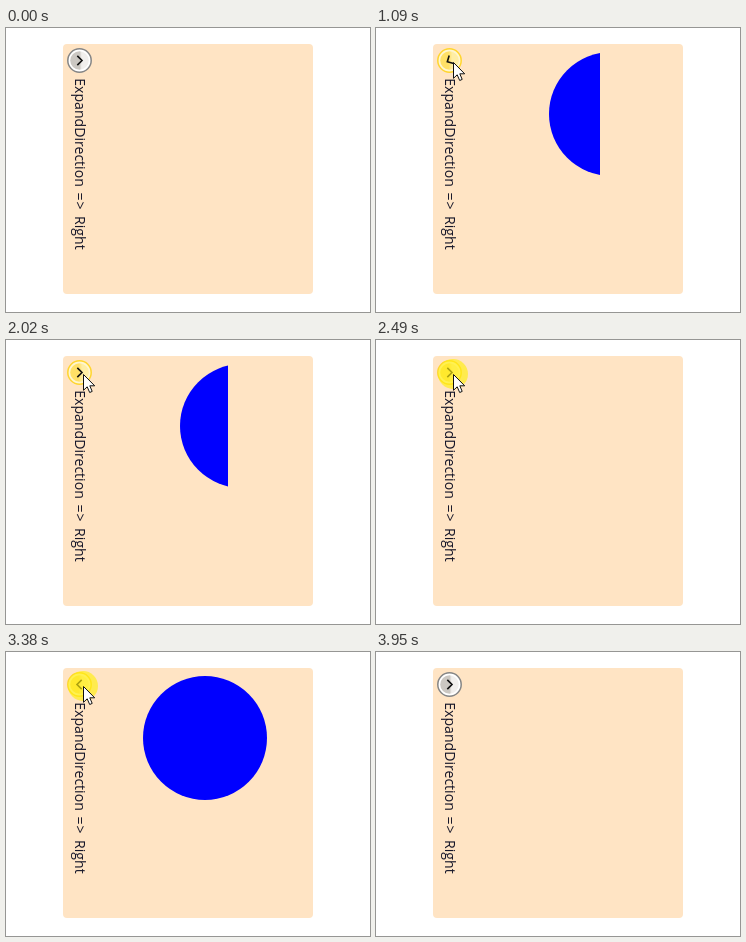
These frames come from a looping animation (364x284 px, 4.38 s). An HTML page:

```html
<!DOCTYPE html>
<html lang="en">
<head>
<meta charset="utf-8">
<title>Expander</title>
<style>
  html, body { margin: 0; width: 100%; height: 100%; overflow: hidden; background: #fff; }
  svg { display: block; width: 364px; height: 284px; }
  text { font: 14.1px "Open Sans", "Noto Sans", sans-serif; fill: #151528; }
  .arrow { letter-spacing: 1px; }
</style>
</head>
<body>
<svg viewBox="0 0 364 284">
  <defs>
    <linearGradient id="plain">
      <stop offset=".5" stop-color="#cbc7c2"/>
      <stop offset=".62" stop-color="#f1efed"/>
    </linearGradient>
    <linearGradient id="hover">
      <stop offset=".45" stop-color="#ffe066"/>
      <stop offset=".65" stop-color="#ffeea4"/>
    </linearGradient>
    <clipPath id="reveal"><rect id="window" y="20" height="132"/></clipPath>
  </defs>
  <rect x="57" y="16" width="250" height="250" rx="4" fill="#ffe4c4"/>
  <g clip-path="url(#reveal)"><circle id="ball" cy="86" r="62" fill="#00f"/></g>
  <g transform="translate(68.5 0) rotate(90)">
    <text x="50.2">ExpandDirection</text>
    <text x="164.5" class="arrow">=&gt;</text>
    <text x="188">Right</text>
  </g>
  <circle id="ring" cx="73.5" cy="32.5" r="11.7" fill="#fff" stroke-width="1.5"/>
  <circle id="face" cx="73.5" cy="32.5" r="9.3"/>
  <path id="chevron" d="M-2.2 -4.6 L2.5 0 L-2.2 4.6" fill="none" stroke="#111" stroke-width="1.6"/>
  <circle id="flash" cx="77" cy="34" r="15" fill="#ffee10" opacity=".65"/>
  <path id="cursor" d="M.5 .5 V16.3 L4.2 12.8 L6.7 18.5 L9.2 17.4 L6.8 11.8 H11.7 Z"
        fill="#fff" stroke="#111" stroke-width="1" stroke-linejoin="round"/>
</svg>
<script>
const LOOP = 4380;
const BALL_SIZE = 124;
const CENTER = 198.5;
const FLASH_TIME = 140;
const SLIDE_TIME = 207;
const TURN_TIME = 180;
const TURN_LEAD = 65;
const OPEN_DELAY = 275;
const CLOSE_DELAY = 205;

const clicks = [730, 1690, 2490, 3380];
const entry = [238, 184];
const moves = [
  { at: 80, time: 100, to: [39, 11] },
  { at: 380, time: 100, to: [78, 37] },
  { at: 760, time: 20, to: [77, 34] },
  { at: 3780, time: 100, to: [278, 226] },
  { at: 3905, time: 40, to: [342, 268] }
];

const el = id => document.getElementById(id);
const set = (id, attrs) => {
  for (const name in attrs) el(id).setAttribute(name, attrs[name]);
};
const show = (id, on) => set(id, { visibility: on ? "visible" : "hidden" });
const ramp = (t, start, time) => Math.min(1, Math.max(0, (t - start) / time));

// Clicks alternately open and close the expander.
const toggled = (t, lead, time) => clicks.reduce((sum, click, i) => {
  const opening = i % 2 === 0;
  const step = ramp(t, click + (opening ? OPEN_DELAY : CLOSE_DELAY) - lead, time);
  return sum + (opening ? step : -step);
}, 0);

const cursorAt = t => moves.reduce((pos, { at, time, to }) => {
  const k = ramp(t, at, time);
  return pos.map((v, i) => v + (to[i] - v) * k);
}, entry);

function draw(t) {
  const fullWidth = BALL_SIZE * toggled(t, 0, SLIDE_TIME);
  const left = Math.round(CENTER - fullWidth / 2);
  set("window", { x: left, width: Math.floor(fullWidth + 1e-6) });
  set("ball", { cx: left + BALL_SIZE / 2 });

  const hovered = t >= 460 && t < 3800;
  set("ring", {
    stroke: hovered ? "#ffd52e" : "#858585",
    fill: hovered ? "#fff6cf" : "#fff"
  });
  set("face", { fill: `url(#${hovered ? "hover" : "plain"})` });

  const turn = 180 * toggled(t, TURN_LEAD, TURN_TIME);
  set("chevron", { transform: `translate(73.5 32.5) rotate(${turn})` });

  show("flash", clicks.slice(1).some(c => t >= c && t < c + FLASH_TIME));
  set("cursor", { transform: `translate(${cursorAt(t)})` });
  show("cursor", t >= 80 && t < 3950);
}

const start = performance.now();
function tick() {
  draw((performance.now() - start) % LOOP);
  requestAnimationFrame(tick);
}
tick();
</script>
</body>
</html>
```
